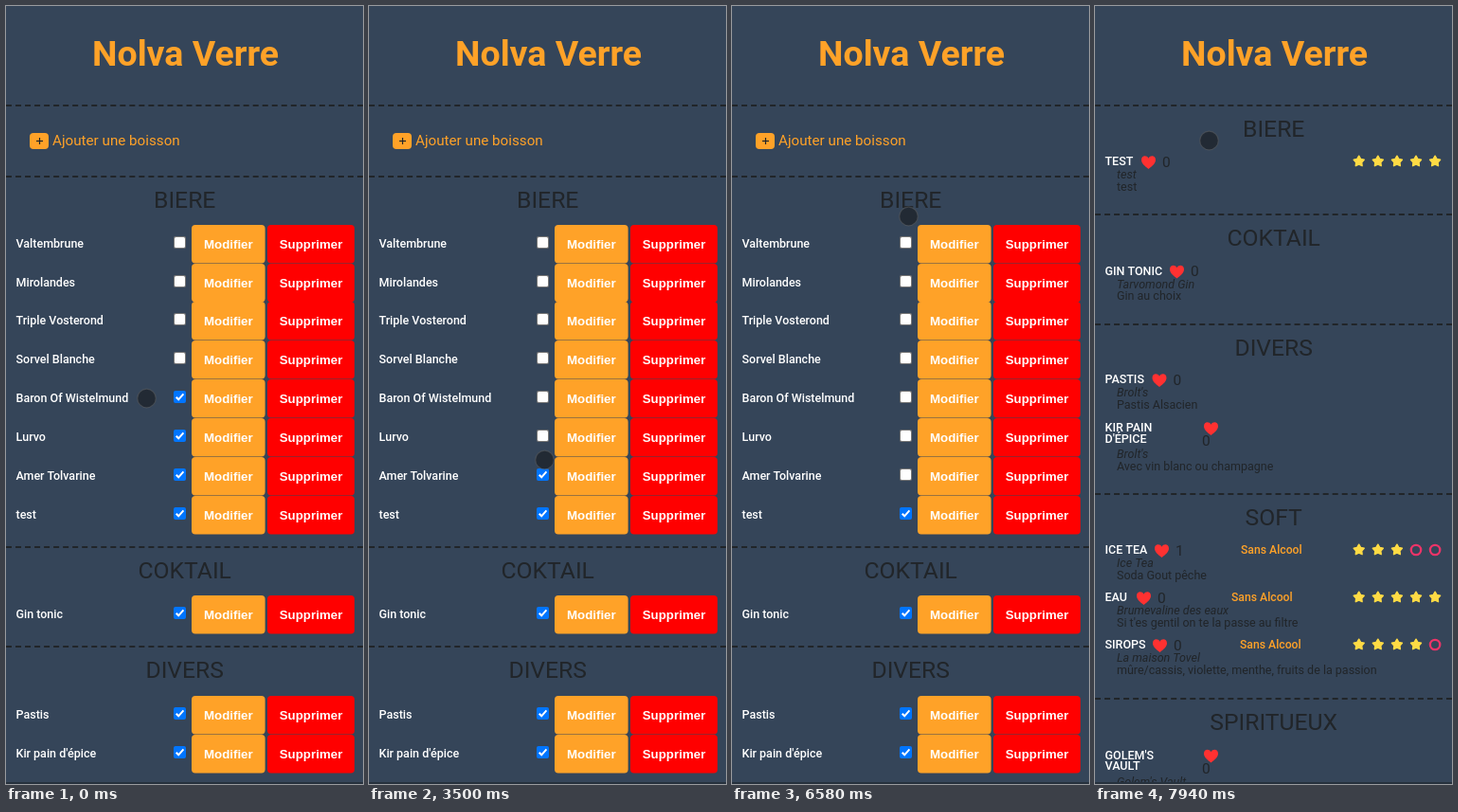
An HTML page with a canvas for the animation above (8 s loop, 377x821 px).

```html
<!DOCTYPE html>
<html lang="fr">
<head>
<meta charset="utf-8">
<title>Carte des boissons</title>
<style>
  html, body { margin: 0; width: 100%; height: 100%; overflow: hidden; background: #354559; }
  canvas { display: block; width: 377px; height: 821px; }
</style>
</head>
<body>
<canvas id="stage"></canvas>
<script>
const W = 377, H = 821, LOOP = 8000;
const ORANGE = '#ffa228', RED = '#ff0000', DARK = '#212529', BG = '#354559';
const SANS = 'Roboto, "Noto Sans", sans-serif';
const BUTTON_FONT = 'bold 13.333px "Liberation Sans", Arial, sans-serif';
const HOME_AT = 7790, ARROW_AT = 7640, ROW = 40.81;

const canvas = document.getElementById('stage');
const ctx = canvas.getContext('2d');
const ratio = window.devicePixelRatio || 1;
canvas.width = W * ratio;
canvas.height = H * ratio;

// Admin list: each drink is [name, time at which it gets unchecked]
const sections = [
  { title: 'BIERE', line: 180, top: 230.85, drinks: [
    ['Valtembrune', 0], ['Mirolandes', 0], ['Triple Vosterond', 0], ['Sorvel Blanche', 0],
    ['Baron Of Wistelmund', 2650], ['Lurvo', 3350], ['Amer Tolvarine', 4390], ['test', LOOP]] },
  { title: 'COKTAIL', line: 571, top: 621.85, drinks: [['Gin tonic', LOOP]] },
  { title: 'DIVERS', line: 676, top: 727.85, drinks: [['Pastis', LOOP], ["Kir pain d'épice", LOOP]] }
];

// Public menu
const menuTitles = [['BIERE', 105], ['COKTAIL', 220], ['DIVERS', 336], ['SOFT', 515], ['SPIRITUEUX', 731]];
const menu = [
  { y: 168, name: ['TEST'], heart: 57, notes: ['test', 'test'], stars: 5 },
  { y: 283.5, name: ['GIN TONIC'], heart: 87, notes: ['Tarvomond Gin', 'Gin au choix'] },
  { y: 398, name: ['PASTIS'], heart: 68.5, notes: ["Brolt's", 'Pastis Alsacien'] },
  { y: 449, name: ['KIR PAIN', "D'ÉPICE"], heart: 123, notes: ["Brolt's", 'Avec vin blanc ou champagne'] },
  { y: 578, name: ['ICE TEA'], heart: 71, likes: 1, notes: ['Ice Tea', 'Soda Gout pêche'], soft: 154, stars: 3 },
  { y: 628, name: ['EAU'], heart: 52, notes: ['Brumevaline des eaux', "Si t'es gentil on te la passe au filtre"], soft: 144, stars: 5 },
  { y: 678, name: ['SIROPS'], heart: 69, notes: ['La maison Tovel', 'mûre/cassis, violette, menthe, fruits de la passion'], soft: 153, stars: 4 },
  { y: 794.5, name: ["GOLEM'S", 'VAULT'], heart: 123, notes: ["Golem's Vault", ''] }
];

// Pointer strokes: evenly timed stops between start and end
const strokes = [
  { start: 0, end: 0, stops: [[148.5, 414]] },
  { start: 1030, end: 1760, stops: [[152, 413], [160, 411], [168, 410], [176, 411], [181, 413], [183, 414]] },
  { start: 2220, end: 2220, stops: [[184, 413.5]] },
  { start: 2510, end: 3050, stops: [[184, 413], [184, 414], [187, 422], [187.5, 438], [186, 450.5]] },
  { start: 3350, end: 3780, stops: [[187, 459], [185.5, 479], [186, 488], [184, 492.5]] },
  { start: 4390, end: 5420, stops: [[185, 494], [170, 511], [125, 515], [66, 499], [24.5, 468], [95, 398], [240, 430], [198, 505]] },
  { start: 5550, end: 6580, stops: [[187, 557], [166, 530], [157, 460], [165, 380], [180, 320], [200, 270], [195, 236], [186.5, 222]] },
  { start: 6730, end: 7640, stops: [[188, 210], [192, 180], [193, 140], [186, 100], [178, 66], [172, 42], [170.5, 54]] },
  { start: 7790, end: 7940, stops: [[150, 100], [120.5, 142]] }
];
const presses = [[2220, 2650], [3050, 3350], [3780, 4390]];

function pointerAt(t) {
  const s = strokes.filter(k => k.start <= t).pop();
  const last = s.stops.length - 1;
  const gap = last ? (s.end - s.start) / last : 1;
  let i = 0;
  while (i < last && t >= s.start + Math.floor((i + 1) * gap / 10) * 10) i++;
  return s.stops[i];
}

function text(str, x, y, color, font, align = 'left') {
  ctx.font = font;
  ctx.fillStyle = color;
  ctx.textAlign = align;
  ctx.fillText(str, x, y);
}

const label = (str, x, y, color, size = 12.5, style = '') =>
  text(str, x, y, color, `${style} ${size}px ${SANS}`);

function box(x, y, w, h, r, fill) {
  ctx.beginPath();
  ctx.roundRect(x, y, w, h, r);
  ctx.fillStyle = fill;
  ctx.fill();
}

function polyline(points, color, width) {
  ctx.beginPath();
  points.forEach(([x, y]) => ctx.lineTo(x, y));
  ctx.strokeStyle = color;
  ctx.lineWidth = width;
  ctx.stroke();
}

function divider(y) {
  ctx.setLineDash([6, 4.027]);
  polyline([[0, y], [W, y]], DARK, 2);
  ctx.setLineDash([]);
}

function heading(title, line) {
  divider(line);
  text(title, 188.7, line + 33.3, DARK, `24.7px ${SANS}`, 'center');
}

function checkbox(x, y, checked) {
  box(x, y, 13, 13, 2, checked ? '#0075ff' : '#767676');
  if (checked) polyline([[x + 2.7, y + 6.7], [x + 5.2, y + 9.3], [x + 10.4, y + 3.4]], '#fff', 2);
  else box(x + 1, y + 1, 11, 11, 1.5, '#fff');
}

function button(str, x, y, w, color) {
  box(x, y, w, 40.6, 4, color);
  text(str, x + w / 2, y + 25, '#fff', BUTTON_FONT, 'center');
}

function adminPage(t) {
  divider(105);
  box(25, 134, 20, 17, 4, ORANGE);
  polyline([[32, 142.5], [39, 142.5]], DARK, 1.2);
  polyline([[35.5, 139], [35.5, 146]], DARK, 1.2);
  label('Ajouter une boisson', 49, 147, ORANGE, 15.2);
  for (const { title, line, top, drinks } of sections) {
    heading(title, line);
    drinks.forEach(([name, offAt], i) => {
      const y = Math.round(top + i * ROW);
      label(name, 10.5, y + 24, '#fff', 12.5, '500');
      checkbox(177, y + 12, t < offAt);
      button('Modifier', 196, y, 77.6, ORANGE);
      button('Supprimer', 276, y, 92, RED);
    });
  }
}

function heart(x, y) {
  ctx.beginPath();
  ctx.moveTo(x, y + 7);
  ctx.bezierCurveTo(x - 4, y + 4, x - 7.5, y + 1, x - 7.5, y - 2.5);
  ctx.bezierCurveTo(x - 7.5, y - 7.5, x - 2, y - 8, x, y - 4.3);
  ctx.bezierCurveTo(x + 2, y - 8, x + 7.5, y - 7.5, x + 7.5, y - 2.5);
  ctx.bezierCurveTo(x + 7.5, y + 1, x + 4, y + 4, x, y + 7);
  ctx.fillStyle = '#ff3131';
  ctx.fill();
}

function star(x, y) {
  ctx.beginPath();
  for (let i = 0; i < 10; i++) {
    const a = i * Math.PI / 5 - Math.PI / 2, r = i % 2 ? 3.2 : 5.8;
    ctx.lineTo(x + r * Math.cos(a), y + r * Math.sin(a));
  }
  ctx.closePath();
  ctx.lineJoin = 'round';
  ctx.lineWidth = 1.4;
  ctx.fillStyle = ctx.strokeStyle = '#ffdb45';
  ctx.fill();
  ctx.stroke();
  ctx.lineJoin = 'miter';
}

function ring(x, y, r, color, width) {
  ctx.beginPath();
  ctx.arc(x, y, r, 0, Math.PI * 2);
  ctx.strokeStyle = color;
  ctx.lineWidth = width;
  ctx.stroke();
}

function menuPage() {
  menuTitles.forEach(([title, line]) => heading(title, line));
  for (const { y, name, heart: hx, likes = 0, notes, soft, stars } of menu) {
    const tall = name.length > 1;
    name.forEach((str, i) => label(str, 10.5, y + i * 11.5, '#fff', 12.5, '500'));
    heart(hx - 0.5, y - 3);
    label(String(likes), tall ? hx - 10 : hx + 14, y + (tall ? 15 : 1.5), DARK, 15.5);
    const noteY = y + (tall ? 28 : 14);
    label(notes[0], 23, noteY, DARK, 12.5, 'italic');
    label(notes[1], 23, noteY + 12.5, DARK);
    if (soft) label('Sans Alcool', soft, y, ORANGE, 12.2, '500');
    for (let i = 0; stars && i < 5; i++) {
      const x = 278.7 + i * 20.1;
      if (i < stars) star(x, y - 4);
      else ring(x, y - 4, 5.2, '#ee3468', 2.3);
    }
  }
}

function touchDot(x, y, pressed) {
  ctx.beginPath();
  ctx.arc(x, y, 10, 0, Math.PI * 2);
  ctx.fillStyle = `rgba(20,22,25,${pressed ? 0.42 : 0.58})`;
  ctx.fill();
  ring(x, y, 9.8, pressed ? 'rgba(20,24,30,.7)' : 'rgba(95,98,102,.55)', 1.2);
}

function arrow(x, y) {
  const shape = [[0, 0], [0, 16.5], [3.8, 13], [6.5, 19.2], [9.2, 18], [6.5, 12], [11.8, 12]];
  ctx.beginPath();
  shape.forEach(([dx, dy]) => ctx.lineTo(x + dx, y + dy));
  ctx.closePath();
  ctx.fillStyle = '#fff';
  ctx.fill();
  ctx.strokeStyle = '#111';
  ctx.lineWidth = 1;
  ctx.stroke();
}

function draw(t) {
  ctx.setTransform(ratio, 0, 0, ratio, 0, 0);
  ctx.fillStyle = BG;
  ctx.fillRect(0, 0, W, H);
  text('Nolva Verre', 189.5, 63, ORANGE, `bold 37.5px ${SANS}`, 'center');
  if (t < HOME_AT) adminPage(t);
  else menuPage();
  ctx.fillStyle = '#26313d';
  ctx.fillRect(0, 819, W, 2);

  const [x, y] = pointerAt(t);
  if (t >= ARROW_AT && t < HOME_AT) arrow(x, y);
  else touchDot(x, y, presses.some(([from, to]) => t >= from && t < to));
}

const begin = performance.now();
function tick() {
  draw((performance.now() - begin) % LOOP);
  requestAnimationFrame(tick);
}
tick();
</script>
</body>
</html>
```
